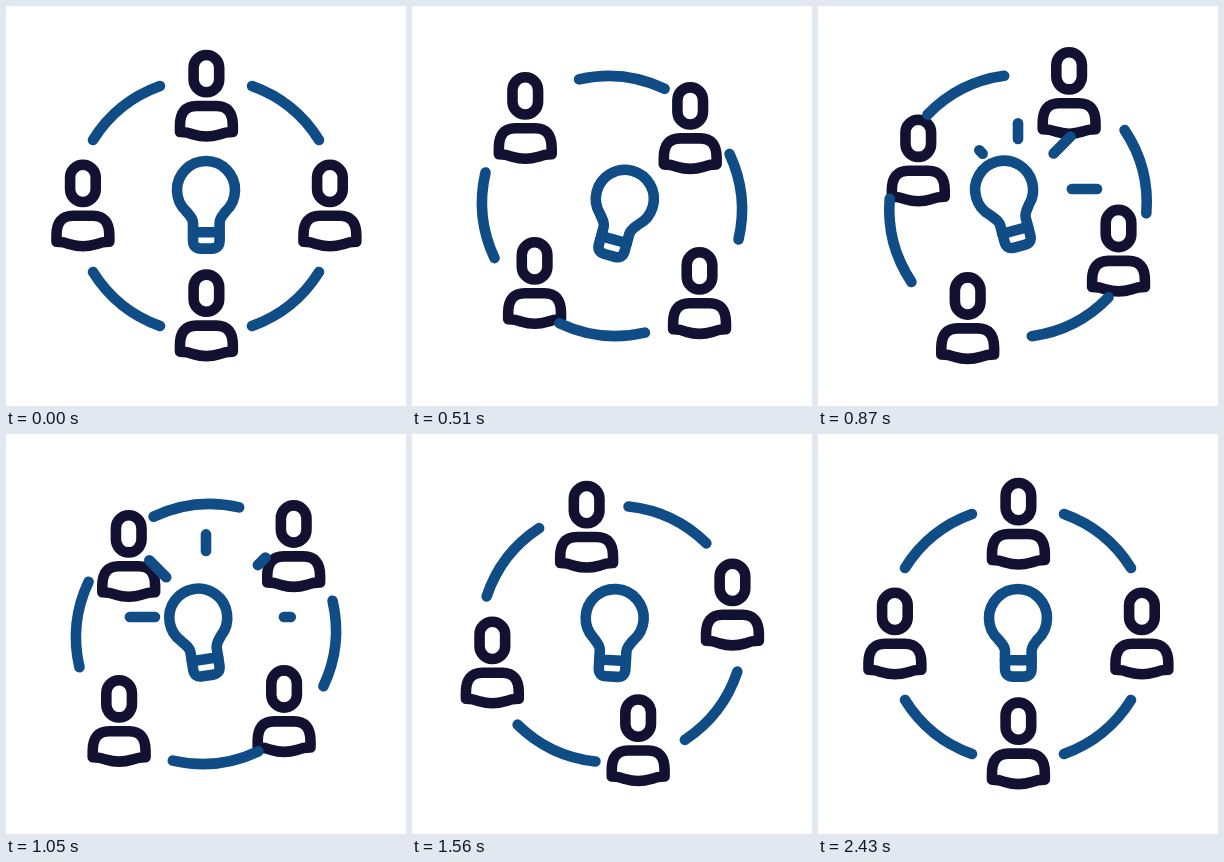
An HTML page for the animation above (4460 ms loop, 400 by 400 pixels).

```html
<!DOCTYPE html>
<html lang="en">
<head>
<meta charset="utf-8">
<title>Team idea</title>
<style>
  html, body { margin: 0; width: 100%; height: 100%; overflow: hidden; background: #fff; }
  svg { display: block; width: 100vw; height: 100vh; }
  .line { fill: none; stroke-width: 10.6; stroke-linecap: round; stroke-linejoin: round; }
  .dark { stroke: #121131; }
  .blue { stroke: #104c86; }
</style>
</head>
<body>
<svg viewBox="0 0 400 400">
  <defs>
    <g id="person">
      <rect x="-12.8" y="-41.5" width="25.6" height="37.2" rx="12.8"/>
      <path d="M-26.4 35.5V29Q-26.4 9.5 -10 9.5H10Q26.4 9.5 26.4 29V35.5Q19 35.5 13 38Q0 42 -13 38Q-19 35.5 -26.4 35.5Z"/>
    </g>
  </defs>
  <g id="people" class="line dark"></g>
  <g id="ring" class="line blue">
    <path d="M-113 -66A131 131 0 0 1 -46 -120"/>
    <path d="M46 -120A131 131 0 0 1 113 -66"/>
    <path d="M113 66A131 131 0 0 1 46 120"/>
    <path d="M-46 120A131 131 0 0 1 -113 66"/>
  </g>
  <g id="bulb" class="line blue">
    <path d="M187 226.2V217C187 212 183 209 180 205A29 29 0 1 1 220 205C217 209 213.6 212 213.6 217V226.2Z"/>
    <path d="M187 226.2V234.5Q187 242.6 195 242.6H205.6Q213.6 242.6 213.6 234.5V226.2"/>
  </g>
  <g id="rays" class="line blue"></g>
</svg>
<script>
const LOOP = 4460, MOVE = 2430, STEP = 30;
const NS = 'http://www.w3.org/2000/svg';
const $ = id => document.getElementById(id);
const clamp = v => Math.min(1, Math.max(0, v));

function add(parent, tag, attrs = {}) {
  const node = document.createElementNS(NS, tag);
  for (const name in attrs) node.setAttribute(name, attrs[name]);
  return parent.appendChild(node);
}

// Cubic bezier ease with handles (.334, 0) and (.123, 1)
function ease(x) {
  if (x <= 0) return 0;
  if (x >= 1) return 1;
  let lo = 0, hi = 1;
  for (let i = 0; i < 30; i++) {
    const s = (lo + hi) / 2, r = 1 - s;
    if (3 * .334 * s * r * r + 3 * .123 * s * s * r + s * s * s < x) lo = s;
    else hi = s;
  }
  return lo * lo * (3 - 2 * lo);
}

// Smooth interpolation through [time, value] keys
function track(keys, t) {
  for (let i = 1; i < keys.length; i++) {
    const [t0, a] = keys[i - 1], [t1, b] = keys[i];
    if (t <= t1) {
      const u = clamp((t - t0) / (t1 - t0));
      return a + (b - a) * u * u * (3 - 2 * u);
    }
  }
  return keys[keys.length - 1][1];
}

const TILT = [[0, 0], [400, 20], [880, -15], [1360, 6.5], [1840, -2], [2320, 0]];
const SHIFT_X = [[0, 0], [360, 0], [660, -1.3], [1230, .5], [1950, -1.2], [2430, 0]];
const DROP = [[0, 0], [360, 14], [660, 0], [870, -2], [1230, 0]];

const people = [[0, -109.8], [123.5, 0], [0, 109.8], [-123.5, 0]].map(([x, y]) =>
  ({ x, y, node: add($('people'), 'use', { href: '#person' }) }));

const rays = [0, 1, 2, 3, 4].map(i =>
  ({ angle: -i * Math.PI / 4, delay: i * 54, node: add($('rays'), 'line') }));

function drawRay({ angle, delay, node }, t) {
  const head = ease((t - delay - 630) / 475);
  const tail = ease((t - delay - 785) / 560);
  const shown = head > .03 && head - tail > .003;
  node.setAttribute('visibility', shown ? 'visible' : 'hidden');
  [tail, head].forEach((p, i) => {
    const r = 50 + 35 * p;
    node.setAttribute('x' + (i + 1), 200 + r * Math.cos(angle));
    node.setAttribute('y' + (i + 1), 183 + r * Math.sin(angle));
  });
}

function draw(time) {
  const t = Math.min(MOVE, Math.floor(time / STEP) * STEP);
  const turn = 180 * ease(t / MOVE);
  const c = Math.cos(turn * Math.PI / 180), s = Math.sin(turn * Math.PI / 180);

  for (const { x, y, node } of people) {
    node.setAttribute('transform',
      `translate(${200.4 + x * c - y * s} ${200.3 + x * s + y * c})`);
  }
  $('ring').setAttribute('transform', `translate(200 200) rotate(${turn})`);
  $('bulb').setAttribute('transform',
    `translate(${track(SHIFT_X, t)} ${track(DROP, t)}) rotate(${track(TILT, t)} 200 235)`);
  rays.forEach(ray => drawRay(ray, t));
}

const start = performance.now();
function frame() {
  draw((performance.now() - start) % LOOP);
  requestAnimationFrame(frame);
}
frame();
</script>
</body>
</html>
```
